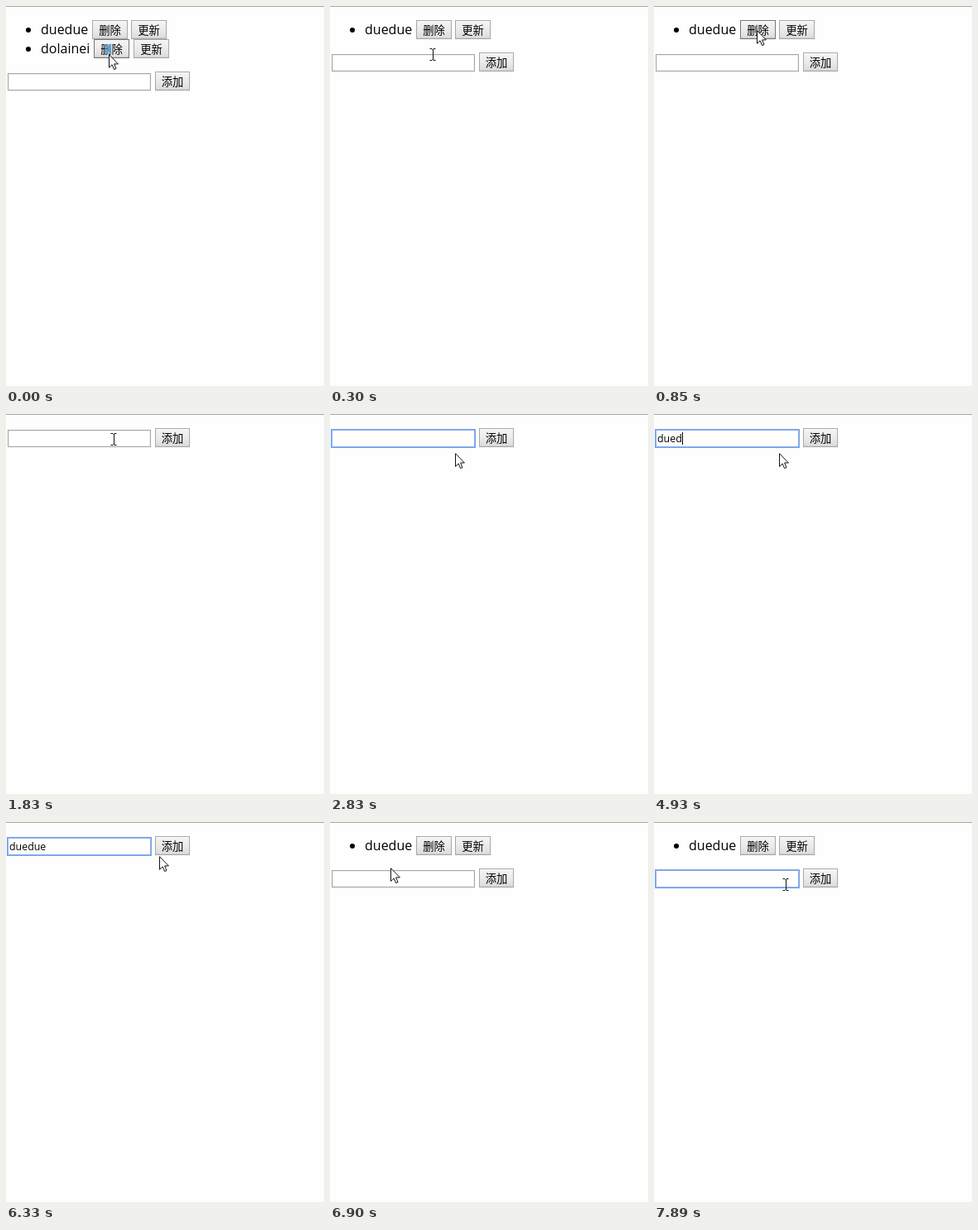
Write an HTML page that moves like this. It is 384 px wide and 458 px high and loops after 8000 ms.

```html
<!DOCTYPE html>
<html lang="zh">
<head>
<meta charset="utf-8">
<style>
  html, body { margin: 0; width: 100%; height: 100%; overflow: hidden; background: #fefefe; }
  svg { display: block; width: 384px; height: 458px; }
  text { white-space: pre; }
  .name { font: 16px "Open Sans", "Noto Sans", sans-serif; }
  .label { font: 13.33px "Noto Sans CJK SC", "Noto Sans CJK", sans-serif; text-anchor: middle; }
  .typed { font: 12.4px "Open Sans", "Noto Sans", sans-serif; }
  rect { shape-rendering: crispEdges; }
</style>
</head>
<body>
<svg viewBox="0 0 384 458">
  <defs>
    <linearGradient id="face" x2="0" y2="1">
      <stop offset="0" stop-color="#f5f5f5"/>
      <stop offset=".5" stop-color="#ebebeb"/>
      <stop offset="1" stop-color="#dbdbdb"/>
    </linearGradient>
  </defs>
  <rect width="384" height="458" fill="#fefefe"/>
  <rect width="384" height="1" fill="#a9a9a9"/>
  <g id="page"></g>
</svg>
<script>
const LOOP = 8000, TOP = 17, ROW = 23;
const NAME = 'duedue';
const ROWS = [
  { name: NAME, remove: 104, update: 151 },
  { name: 'dolainei', remove: 106, update: 154 }
];

// Each step overrides only what changes; pos is the pointer's hot spot.
const STEPS = [
  [0,    { rows: 2, pos: [124, 58], typed: '', focus: false, caret: false, glow: true }],
  [150,  { glow: false }],
  [290,  { rows: 1 }],
  [430,  { pos: [124, 54] }],
  [570,  { pos: [124, 43] }],
  [710,  { pos: [124, 33] }],
  [850,  { pos: [124, 29] }],
  [1530, { rows: 0 }],
  [1670, { pos: [126, 30] }],
  [1810, { pos: [130, 30] }],
  [1950, { pos: [134, 30] }],
  [2090, { pos: [137, 31] }],
  [2240, { focus: true, caret: true }],
  [2380, { pos: [146, 40] }],
  [2520, { pos: [151, 47] }],
  [2830, { caret: false }],
  [3240, { caret: true, typed: NAME.slice(0, 2) }],
  [3380, { typed: NAME.slice(0, 3) }],
  [3510, { typed: NAME.slice(0, 4) }],
  [3640, { typed: NAME.slice(0, 5) }],
  [3780, { typed: NAME }],
  [4370, { caret: false }],
  [4780, { caret: true, typed: NAME.slice(0, 5) }],
  [4930, { typed: NAME.slice(0, 4) }],
  [5340, { typed: NAME.slice(0, 5) }],
  [5490, { typed: NAME }],
  [6050, { caret: false, pos: [156, 47] }],
  [6190, { pos: [172, 45] }],
  [6330, { pos: [185, 41] }],
  [6480, { pos: [190, 34] }],
  [6620, { rows: 1, typed: '', focus: false, pos: [184, 36] }],
  [6760, { pos: [128, 46] }],
  [6900, { pos: [73, 55] }],
  [7020, { pos: [72, 67] }],
  [7170, { pos: [78, 69] }],
  [7310, { focus: true, caret: true }],
  [7450, { pos: [126, 73] }],
  [7590, { pos: [159, 75] }],
  [7890, { caret: false }]
];

let last = {};
const timeline = STEPS.map(([at, change]) => ({ at, state: last = { ...last, ...change } }));

const page = document.getElementById('page');
const ruler = document.createElement('canvas').getContext('2d');
ruler.font = '12.4px "Open Sans", "Noto Sans", sans-serif';

const inside = ([px, py], x, y, w, h) => px >= x && px < x + w && py >= y && py < y + h;
const box = (x, y, w, h, fill) => `<rect x="${x}" y="${y}" width="${w}" height="${h}" fill="${fill}"/>`;
const frame = (x, y, w, h, color, fill = 'none') =>
  `<rect x="${x + .5}" y="${y + .5}" width="${w - 1}" height="${h - 1}" stroke="${color}" fill="${fill}"/>`;

function button(x, y, label, pos, w = 43) {
  const hot = inside(pos, x, y, w, ROW);
  return frame(x, y, w, ROW, hot ? '#777' : '#a8a8a8', 'url(#face)') +
    box(x + 1, y + 1, w - 2, 1, '#fafafa') +
    box(x + 1, y + ROW - 2, w - 2, 1, hot ? '#c4c4c4' : '#cfcfcf') +
    `<text class="label" x="${x + w / 2}" y="${y + 16.6}">${label}</text>`;
}

function listRow({ name, remove, update }, y, pos) {
  return `<circle cx="27" cy="${y + 12}" r="3"/>` +
    `<text class="name" x="42" y="${y + 17}">${name}</text>` +
    button(remove, y, '删除', pos) + button(update, y, '更新', pos);
}

function field(y, { typed, focus, caret }) {
  const edge = focus
    ? frame(1, y + 1, 175, 23, '#7ba5ee', '#fff') + frame(2, y + 2, 173, 21, '#86abea')
    : frame(2, y + 2, 173, 21, '#a6a6a6', '#fff') + frame(3, y + 3, 171, 19, '#f0f0f0');
  const caretX = Math.round(4 + ruler.measureText(typed).width);
  return edge + `<text class="typed" x="4" y="${y + 17}">${typed}</text>` +
    (caret ? box(caretX, y + 5, 1, 15, '#000') : '');
}

function pointer([x, y], overField) {
  const shape = overField
    ? '<path d="M-3.5-6.5h2.5l1 1 1-1h2.5M-3.5 7.5h2.5l1-1 1 1h2.5M.5-6V7" fill="none" stroke="#111"/>'
    : '<path d="M.5.7V16.3L4.1 12.8 6.6 18.5 9 17.5 6.6 11.9H11.4Z" fill="#fff" stroke="#111"/>';
  return `<g transform="translate(${x} ${y})">${shape}</g>`;
}

function draw(state) {
  const { rows, pos, glow } = state;
  const formY = TOP + (rows ? rows * ROW + 16 : 0);
  page.innerHTML =
    ROWS.slice(0, rows).map((row, i) => listRow(row, TOP + i * ROW, pos)).join('') +
    field(formY, state) +
    button(180, formY, '添加', pos, 42) +
    (glow ? '<rect x="119" y="46" width="8" height="12" fill="#55aee8" opacity=".6"/>' : '') +
    pointer(pos, inside(pos, 2, formY + 2, 173, 21));
}

let shown;
function tick() {
  const t = performance.now() % LOOP;
  const step = timeline.findLast(s => s.at <= t);
  if (step !== shown) draw((shown = step).state);
  requestAnimationFrame(tick);
}
tick();
</script>
</body>
</html>
```
